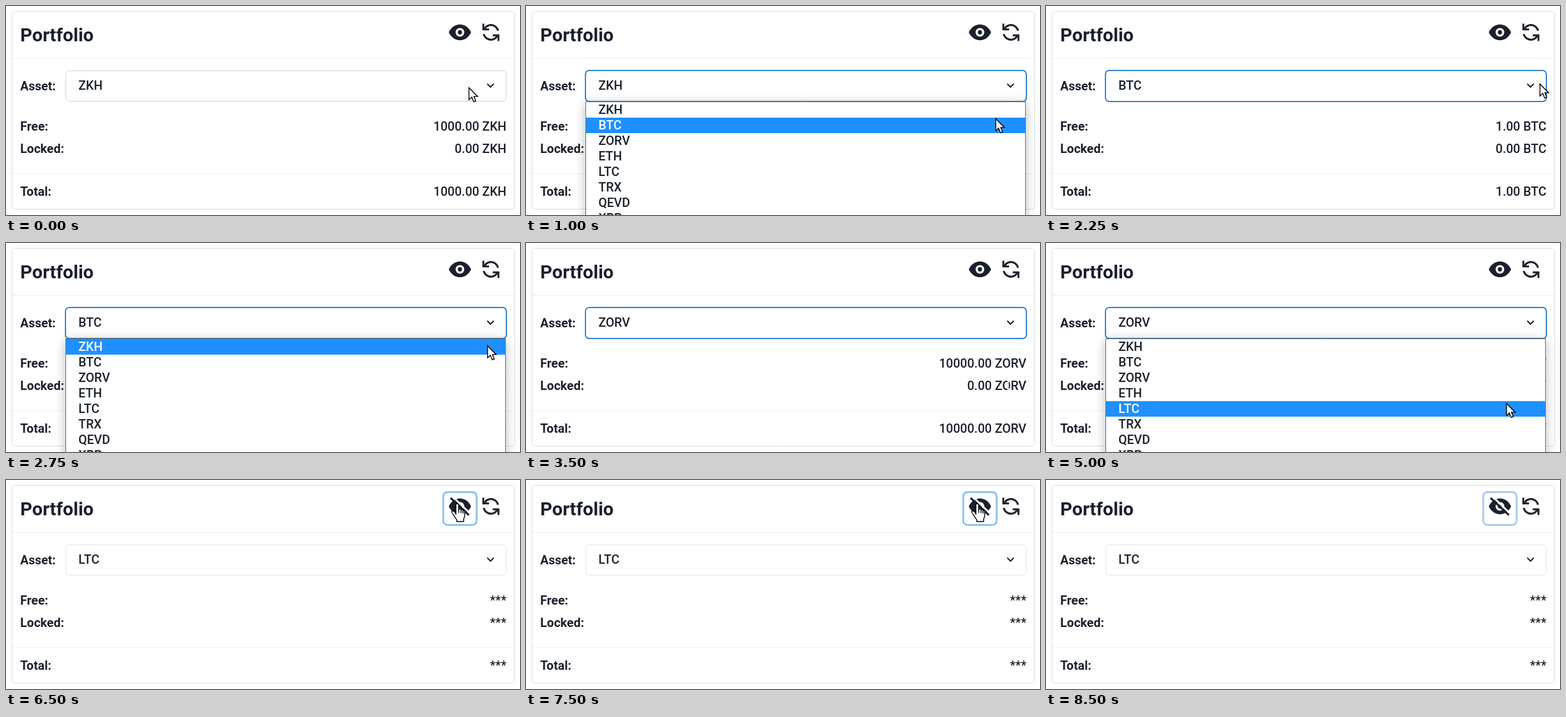
These frames come from a looping animation (830x337 px, 8.75 s). An HTML page with a canvas:

```html
<!DOCTYPE html>
<html lang="en">
<head>
<meta charset="utf-8">
<title>Portfolio</title>
<style>
  html, body { margin: 0; width: 100%; height: 100%; overflow: hidden; background: #fff; }
  canvas { display: block; }
</style>
</head>
<body>
<canvas id="stage" width="830" height="337"></canvas>
<script>
const ctx = document.getElementById('stage').getContext('2d');
const LOOP = 8750, STEP = 250;
const INK = '#1a202c', BLUE = '#3182ce';
const FAMILY = 'Roboto, "Noto Sans", sans-serif';

const assets = ['ZKH', 'BTC', 'ZORV', 'ETH', 'LTC', 'TRX', 'QEVD', 'XRP'];
const amounts = { 0: '1000.00', 1: '1.00', 2: '10000.00', 4: '500.00' };

// [time, asset index] and time spans
const picks = [[0, 0], [1500, 1], [3250, 2], [5250, 4]];
const openSpans = [[500, 1500], [2500, 3250], [4250, 5250]];
const hiddenSpans = [[6250, 7000], [7500, LOOP]];

// pointer path: time, x, y
const path = [
  [0, 747, 131], [500, 756, 130], [750, 757, 160], [1000, 758, 181],
  [1500, 760, 190], [2250, 797, 125], [2500, 785, 130], [2750, 777, 165],
  [3000, 776, 208], [3500, 778, 230], [4000, 776, 130], [4250, 772, 132],
  [4750, 745, 250], [5000, 743, 258], [5250, 743, 262], [6000, 729, 40],
  [6250, 729, 37], [7750, 729, 37], [8250, 745, 300], [8500, 750, 345]
];

const within = (t, spans) => spans.some(([a, b]) => t >= a && t < b);

function pointerAt(t) {
  for (let i = 1; i < path.length; i++) {
    const [t0, x0, y0] = path[i - 1], [t1, x1, y1] = path[i];
    if (t <= t1) {
      const k = (t - t0) / (t1 - t0);
      return { x: Math.round(x0 + (x1 - x0) * k), y: Math.round(y0 + (y1 - y0) * k) };
    }
  }
  return null;
}

function text(str, x, y, weight = 500, size = 20, color = INK, align = 'left') {
  ctx.font = `${weight} ${size}px ${FAMILY}`;
  ctx.fillStyle = color;
  ctx.textAlign = align;
  ctx.fillText(str, x, y);
}

function box(x, y, w, h, r, color, width = 1) {
  ctx.beginPath();
  ctx.roundRect(x, y, w, h, r);
  ctx.strokeStyle = color;
  ctx.lineWidth = width;
  ctx.stroke();
}

function line(points, color, width) {
  ctx.beginPath();
  points.forEach(([x, y]) => ctx.lineTo(x, y));
  ctx.strokeStyle = color;
  ctx.lineWidth = width;
  ctx.stroke();
}

function dot(x, y, r, color) {
  ctx.beginPath();
  ctx.arc(x, y, r, 0, Math.PI * 2);
  ctx.fillStyle = color;
  ctx.fill();
}

const almond = new Path2D('M-18 0C-14.5-7.6-8-12.7 0-12.7S14.5-7.6 18 0C14.5 7.6 8 12.7 0 12.7S-14.5 7.6-18 0Z');
const chevron = new Path2D('M16.59 8.59L12 13.17 7.41 8.59 6 10l6 6 6-6z');
const arrow = new Path2D('M.6.8V20.2L5.2 16 8.2 23.4 11.6 22 8.5 14.9H14.6Z');
const hand = new Path2D('M7.5 19V3.2C7.5.2 12 .2 12 3.2V11C12 9 15.7 9 15.7 11.4C16 10 19 10 19 12.5C19.4 11.3 21.7 11.4 21.7 14V20.5C21.7 23 20 24.5 20 27V30H9V27.3C7.4 25 5 22.5 3.2 18.8C1 16-.3 14.3.8 13.4C2.4 12 5 13.6 7.5 17Z');
const knuckles = new Path2D('M12 10V16M15.7 11.5V16M19 12.6V17');

function at(x, y, draw) {
  ctx.save();
  ctx.translate(x, y);
  draw();
  ctx.restore();
}

function eye(off) {
  at(733, 42.5, () => {
    ctx.fillStyle = INK;
    ctx.fill(almond);
    dot(0, 0, 7, '#fff');
    dot(0, 0, 3.4, INK);
    if (off) {
      line([[-12.5, -16.5], [18, 13]], '#fff', 3);
      line([[-15, -13.5], [14.5, 14.2]], INK, 3.2);
    }
  });
}

function syncIcon() {
  at(783, 42.5, () => {
    for (let i = 0; i < 2; i++) {
      ctx.beginPath();
      ctx.arc(0, 0, 11.8, Math.PI * 1.17, Math.PI * 1.93);
      ctx.strokeStyle = INK;
      ctx.lineWidth = 3.2;
      ctx.stroke();
      line([[-12.2, -14], [-12.2, -4.8], [-3, -4.8]], INK, 3);
      ctx.rotate(Math.PI);
    }
  });
}

function header(t, hidden) {
  text('Portfolio', 23, 57, 700, 30);
  if (t >= 6250) box(706, 19.5, 54, 53, 7, t >= 8500 ? '#a9cbeb' : '#8ec2ed', 3);
  eye(hidden);
  syncIcon();
}

function select(t, name, pointer) {
  const focused = t >= 500 && t < 6500;
  const hover = pointer && pointer.x > 96 && pointer.x < 808 && pointer.y > 104 && pointer.y < 154;
  if (focused) box(96, 104, 712, 50, 6, BLUE, 2);
  else box(96.5, 104.5, 711, 49, 6, hover ? '#cbd0d6' : '#e2e5ea');
  text(name, 117, 135);
  at(770.4, 116.2, () => {
    ctx.fillStyle = INK;
    ctx.fill(chevron);
  });
}

function menu(selected, pointer) {
  const row = pointer.y >= 155 ? Math.floor((pointer.y - 155) / 25) : selected;
  ctx.save();
  ctx.shadowColor = 'rgba(0,0,0,.28)';
  ctx.shadowBlur = 16;
  ctx.shadowOffsetY = 3;
  ctx.fillStyle = '#fff';
  ctx.fillRect(96, 154, 711, 210);
  ctx.restore();
  box(96.5, 154.5, 710, 210, 0, '#666a70');
  ctx.fillStyle = '#1e90ff';
  ctx.fillRect(97, 155 + row * 25, 709, 25);
  assets.forEach((name, i) => text(name, 117, 174 + i * 25, 500, 20, i === row ? '#fff' : INK));
}

function drawPointer({ x, y }, open) {
  const overEye = x > 705 && x < 761 && y > 18 && y < 74;
  const overText = !open && x > 690 && y > 183 && y < 241;
  if (overText) {
    line([[x + .5, y - 10], [x + .5, y + 10]], '#fff', 2);
    return;
  }
  at(overEye ? x - 10 : x, y, () => {
    const shape = overEye ? hand : arrow;
    ctx.fillStyle = '#fff';
    ctx.strokeStyle = '#000';
    ctx.lineWidth = 1.4;
    ctx.fill(shape);
    ctx.stroke(shape);
    if (overEye) ctx.stroke(knuckles);
  });
}

function draw(t) {
  const asset = picks.filter(([start]) => t >= start).pop()[1];
  const open = within(t, openSpans);
  const hidden = within(t, hiddenSpans);
  const pointer = pointerAt(t);
  const amount = n => hidden ? '***' : `${n} ${assets[asset]}`;

  ctx.fillStyle = '#fff';
  ctx.fillRect(0, 0, 830, 337);
  box(9.5, 8.5, 812, 319, 5, '#d9dbde');
  [84.5, 270.5].forEach(y => line([[10, y], [821, y]], '#ebedef', 1));

  header(t, hidden);
  text('Asset:', 23, 136, 600);
  select(t, assets[asset], pointer);

  const total = amounts[asset];
  [['Free:', total, 201], ['Locked:', '0.00', 237], ['Total:', total, 306]].forEach(([label, n, y]) => {
    text(label, 23, y, 600);
    text(amount(n), 808, y, 500, 20, INK, 'right');
  });

  if (open) menu(asset, pointer);
  if (pointer && t < 8500) drawPointer(pointer, open);
}

const start = performance.now();
function tick() {
  const t = (performance.now() - start) % LOOP;
  draw(Math.floor(t / STEP) * STEP);
  requestAnimationFrame(tick);
}
tick();
</script>
</body>
</html>
```
